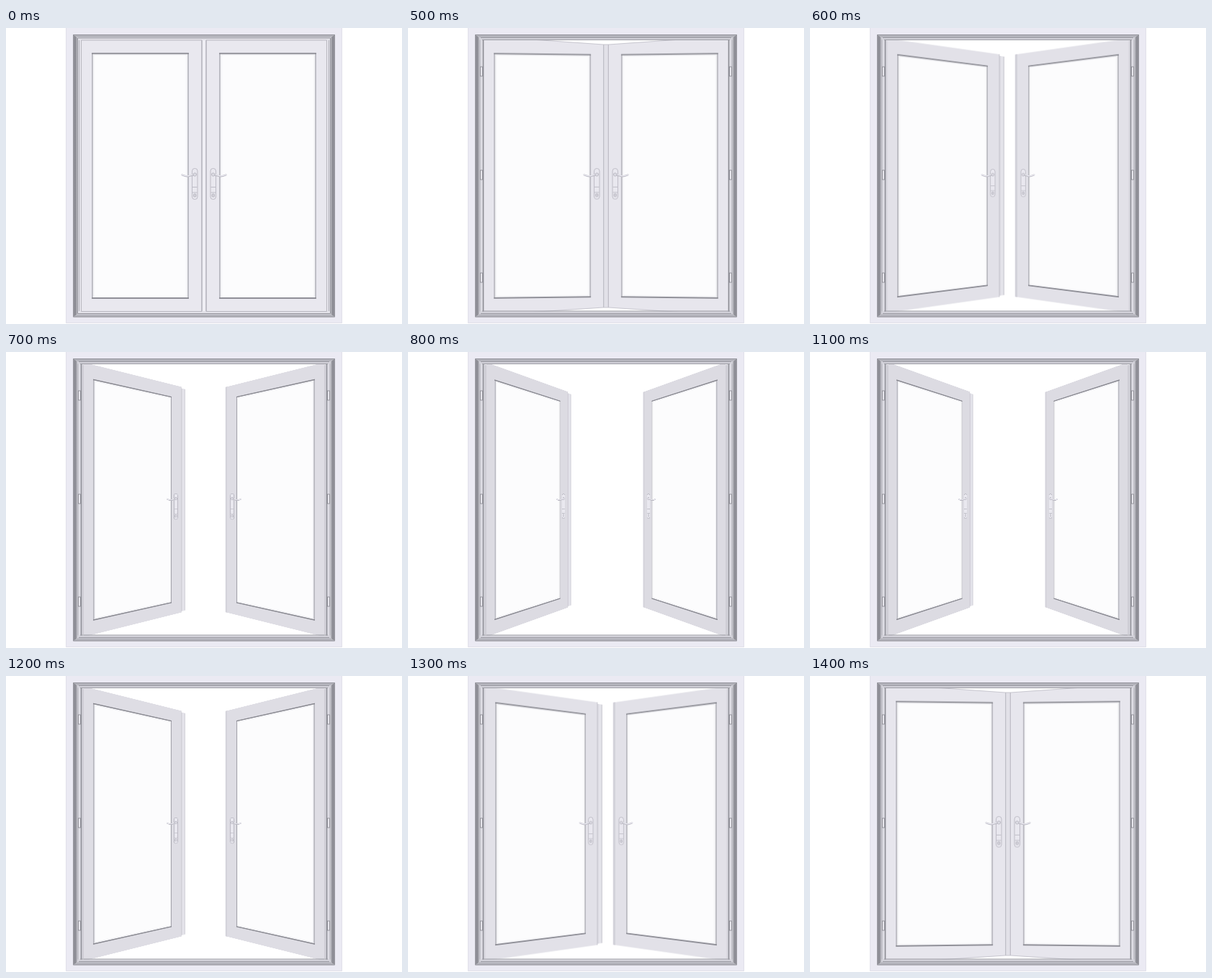
Recreate the animation shown at these times as an HTML page without scripts. Size 550 by 412 pixels, loop 1500 ms.

```html
<!DOCTYPE html>
<html lang="en">
<head>
<meta charset="utf-8">
<title>French doors</title>
<style>
  html, body { margin: 0; width: 100%; height: 100%; overflow: hidden; background: #fff; }
  .stage { position: relative; width: 550px; height: 412px; overflow: hidden; background: #fff; }
  .stage svg, .side { position: absolute; left: 0; top: 0; width: 550px; height: 412px; }

  /* Each side is its own 3D scene; the right one is a mirror image. */
  .side { perspective: 500px; perspective-origin: 275px 205.5px; }
  .right { transform: scaleX(-1); }
  .leaf { overflow: visible; transform-origin: 105.5px 205.5px; }

  .leaf, .shut, .ajar, .ajar-or-shut, .wide, .open {
    animation: 1.5s step-end infinite;
  }
  .leaf { animation-name: swing; }
  .shut { animation-name: shut; }
  .ajar { animation-name: ajar; }
  .ajar-or-shut { animation-name: near; }
  .wide { animation-name: wide; }
  .open { animation-name: open; }

  @keyframes swing {
    0% { transform: none; color: #e9e8ef; }
    33.333%, 93.333% { transform: rotateY(2deg); color: #e7e6ed; }
    40%, 86.667% { transform: translateX(1.5px) rotateY(23deg); color: #e2e1e8; }
    46.667%, 80% { transform: translateX(2.5px) rotateY(40deg); color: #dedde4; }
    53.333%, 73.333% { transform: translateX(3.5px) rotateY(54deg); color: #dcdbe2; }
    60% { transform: translateX(4.5px) rotateY(59.5deg); color: #dad9e0; }
    100% { transform: none; color: #e9e8ef; }
  }
  @keyframes shut { 0%, 100% { opacity: 1; } 33.333% { opacity: 0; } }
  @keyframes open { 0%, 100% { opacity: 0; } 33.333% { opacity: 1; } }
  @keyframes ajar { 0%, 40%, 100% { opacity: 0; } 33.333%, 93.333% { opacity: 1; } }
  @keyframes near { 0%, 93.333%, 100% { opacity: 1; } 40% { opacity: 0; } }
  @keyframes wide { 0%, 93.333%, 100% { opacity: 0; } 40% { opacity: 1; } }
</style>
</head>
<body>
<div class="stage">
  <svg viewBox="0 0 550 412">
    <defs>
      <linearGradient id="jamb">
        <stop offset="0" stop-color="#a5a5ac"/>
        <stop offset=".5" stop-color="#85858d"/>
        <stop offset="1" stop-color="#b9b9c0"/>
      </linearGradient>

      <g id="handle" fill="#e9e8ef" stroke="#b3b2bc" stroke-width=".8">
        <rect x="258.5" y="195.500" width="7.500" height="43" rx="3.500"/>
        <path d="M259 221.500h6.500M259 229h6.500" fill="none"/>
        <rect x="260.500" y="231" width="3.500" height="4" rx="1" fill="#d3d2da"/>
        <path d="M263.500 203.500q-5 1.500-9 2.500t-10-1.500" fill="none" stroke="#b6b5bf" stroke-width="2.200" stroke-linecap="round"/>
        <path d="M263 203.300q-5 1.300-9 2.300t-10-1.300" fill="none" stroke="#eeedf4" stroke-width="1.100" stroke-linecap="round"/>
        <circle cx="262.300" cy="204" r="2.200" fill="#dddce4"/>
      </g>

      <g id="panel">
        <path d="M105.500 14.500H273.500V396.500H105.500ZM120 35.500V376H253V35.500Z" fill="currentColor" fill-rule="evenodd"/>
        <path d="M120 35.500H253V376H120Z" fill="#fcfcfd" stroke="#a3a3ab" stroke-width="1.300"/>
        <path d="M119 35.500H254M119 376H254" stroke="#85858d" stroke-width="1.500"/>
        <path d="M122 37.500H251V374H122Z" fill="none" stroke="#ededf1" stroke-width="1"/>
        <path d="M273 14.500V396.500" stroke="#c2c1ca" stroke-width="1"/>
        <use href="#handle"/>
      </g>

      <!-- rebate and hinges exposed when a leaf swings -->
      <g id="rebate">
        <path d="M99 12h7v388h-7z" fill="#dddce3"/>
        <path d="M100 14V397" stroke="#a9a9b1"/>
        <path d="M104.500 15V396" stroke="#8b8b93" stroke-width="1.500"/>
        <g fill="#e6e5ec" stroke="#84848c" stroke-width=".8">
          <rect x="100.500" y="54" width="3" height="13"/>
          <rect x="100.500" y="198" width="3" height="13"/>
          <rect x="100.500" y="341" width="3" height="13"/>
        </g>
      </g>
      <path id="edge" d="M105.500 17L111 18.500V392.500L105.500 394Z" fill="#cfced6"/>

      <g id="closing">
        <path d="M99 13h7v385h-7z" fill="#e6e5ec"/>
        <path d="M101.500 16V396" stroke="#aaaab2"/>
      </g>
    </defs>
    <g class="wide">
      <use href="#edge"/>
      <use href="#edge" transform="matrix(-1 0 0 1 550 0)"/>
    </g>
  </svg>

  <div class="side">
    <svg class="leaf" viewBox="0 0 550 412">
      <use href="#panel"/>
      <g class="wide">
        <path d="M273 17H281.500V394.500H273Z" fill="#e4e3ea"/>
        <path d="M274 17V394.500M281 17V394.500" stroke="#bdbcc5" stroke-width="1"/>
      </g>
    </svg>
  </div>
  <div class="side right">
    <svg class="leaf" viewBox="0 0 550 412">
      <use href="#panel"/>
      <path class="wide" d="M273 14.500H276V396.500H273Z" fill="#d3d2da"/>
    </svg>
  </div>

  <svg viewBox="0 0 550 412">
    <!-- meeting strip between the leaves -->
    <g class="ajar-or-shut">
      <path d="M272 14H278V397H272Z" fill="#efeef5"/>
      <path d="M272 14V397M278 14V397" stroke="#a7a6b0" stroke-width="1"/>
    </g>

    <!-- gaps above and below the slightly open leaves -->
    <g class="ajar">
      <path d="M275 15V389" stroke="#c9c8d0"/>
      <path d="M165 15L271 23H279L385 15ZM165 397L271 389H279L385 397Z" fill="#fff"/>
      <path d="M165 15.500L271 23H279L385 15.500M165 396L271 389H279L385 396" fill="none" stroke="#c3c2cb" stroke-width=".9"/>
    </g>

    <g class="open">
      <use href="#rebate"/>
      <use href="#rebate" transform="matrix(-1 0 0 1 550 0)"/>
      <path d="M99 12H451V16.500H99ZM99 394.500H451V400H99Z" fill="#d2d1d9"/>
      <path d="M101 13.500H449M103 16.500H447M103 394H447M101 397.500H449" stroke="#9b9ba3" stroke-width="1"/>
    </g>

    <g class="shut">
      <use href="#closing"/>
      <use href="#closing" transform="matrix(-1 0 0 1 550 0)"/>
      <path d="M99 12H451V17H99ZM99 394H451V400H99Z" fill="#e3e2e9"/>
      <path d="M99.500 14H450.500V397.500H99.500Z" fill="none" stroke="#96969e"/>
      <path d="M104.500 17H272V394.500H104.500ZM278 17H445.500V394.500H278Z" fill="none" stroke="#b5b4bd" stroke-width=".9"/>
    </g>

    <!-- fixed outer frame -->
    <path d="M83 0H467V411H83ZM93 9V402.500H457V9Z" fill="#ebeaf3" fill-rule="evenodd"/>
    <path d="M93 9H457L451 13H99ZM93 402.500H457L451 398.500H99Z" fill="#b4b4bc"/>
    <path d="M93 9L99 13V398.500L93 402.500Z" fill="url(#jamb)"/>
    <path d="M93 9L99 13V398.500L93 402.500Z" fill="url(#jamb)" transform="matrix(-1 0 0 1 550 0)"/>
    <path d="M93.500 9.500H456.500V402H93.500Z" fill="none" stroke="#94949c"/>
    <path d="M83.500 0V410.500H466.500V0" fill="none" stroke="#e1e0e9"/>
  </svg>
</div>
</body>
</html>
```
